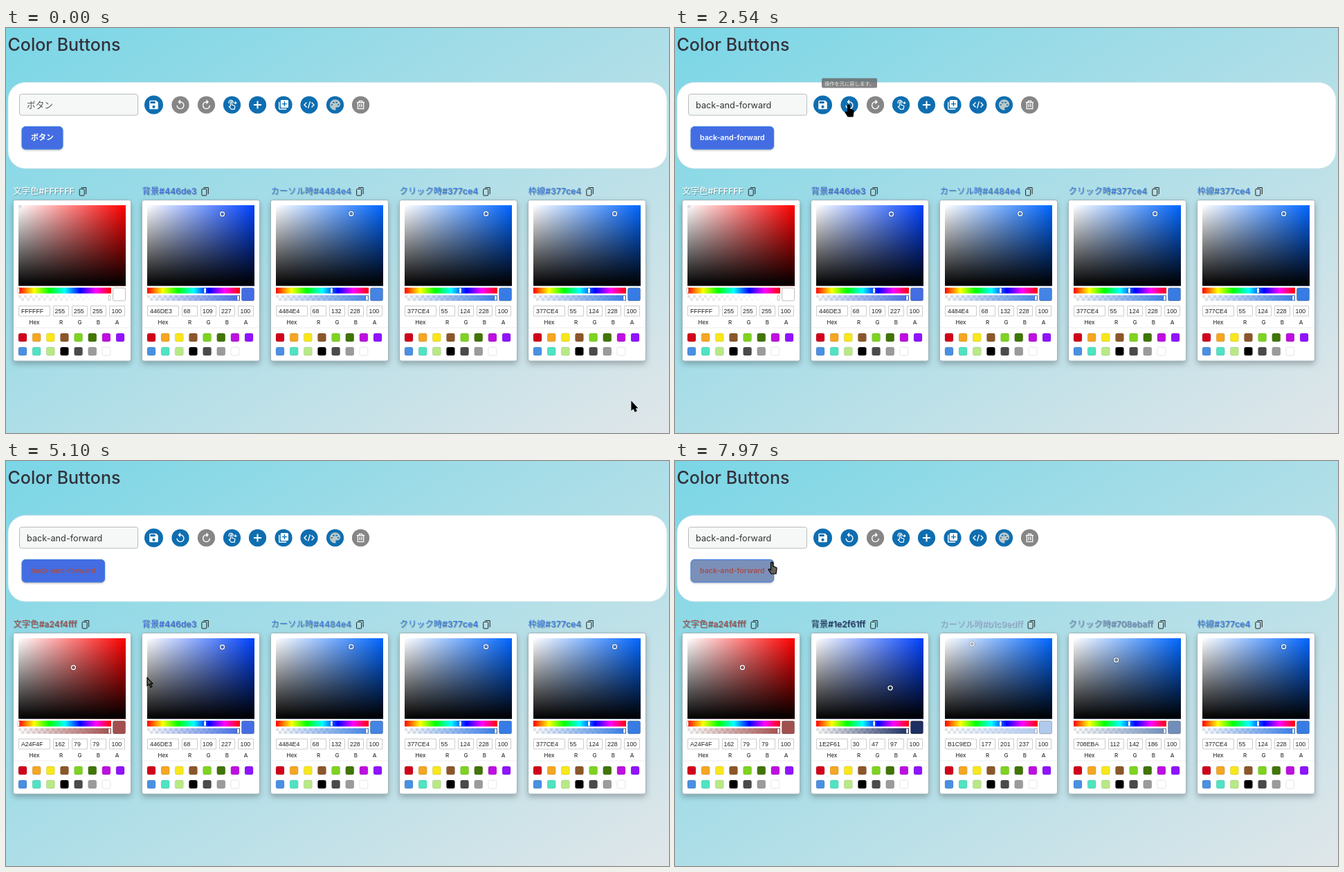
Recreate the animation shown at these times as an HTML page with a canvas. Size 958x585 px, loop 8 s.

```html
<!DOCTYPE html>
<html lang="ja">
<head>
<meta charset="utf-8">
<title>Color Buttons</title>
<style>
html, body { margin: 0; width: 100%; height: 100%; overflow: hidden; }
body { background: linear-gradient(to bottom right, #7ad6e6, #e0e6e9); }
canvas { display: block; }
</style>
</head>
<body>
<canvas id="stage" width="958" height="585"></canvas>
<script>
const c = document.getElementById('stage').getContext('2d');
const LOOP = 8000;
const SANS = 'Inter, "Noto Sans CJK JP", sans-serif';
const BLUE = '#0f6eb0', GRAY = '#868686';
const NAME = 'back-and-forward', EMPTY = 'ボタン';

// Toolbar icons on a 24 unit grid; "line" icons are stroked, others filled.
const UNDO = 'M12 5V1L7 6l5 5V7a6 6 0 1 1-6 6H4a8 8 0 1 0 8-8z';
const icons = [
  { x: 213.5, d: 'M17 3H5a2 2 0 0 0-2 2v14a2 2 0 0 0 2 2h14a2 2 0 0 0 2-2V7zM12 19a3 3 0 1 1 0-6 3 3 0 0 1 0 6zM15 9H5V5h10z' },
  { x: 252, d: UNDO },
  { x: 289.5, d: UNDO, flip: true },
  { x: 326.5, line: 1.7, d: 'M9 15V7a1.5 1.5 0 0 1 3 0v5l5 1.5q1.5.5 1.2 2L17 21h-6l-5-5 1-1 2 1M6 9a4.5 4.5 0 1 1 8.5-2M15 8h6m-2.5-2.5L21 8l-2.500 2.500' },
  { x: 363.5, line: 3, d: 'M12 4v16M4 12h16' },
  { x: 401, d: 'M4 6H2v14a2 2 0 0 0 2 2h14v-2H4zM20 2H8a2 2 0 0 0-2 2v12a2 2 0 0 0 2 2h12a2 2 0 0 0 2-2V4a2 2 0 0 0-2-2zM19 11h-4v4h-2v-4H9V9h4V5h2v4h4z' },
  { x: 438, line: 2, d: 'M7 7l-5 5 5 5M17 7l5 5-5 5M14 5l-4 14' },
  { x: 475.5, tint: '#bcc8c8', size: 0.85, d: 'M12 3a9 9 0 0 0 0 18 1.5 1.5 0 0 0 1.100-2.500A1.5 1.5 0 0 1 14.200 16H16a5 5 0 0 0 5-5c0-4.400-4-8-9-8zM5 11h3v2H5zM8 7h3v2H8zM13 7h3v2h-3zM16 11h3v2h-3z' },
  { x: 512.5, line: 1.8, d: 'M4 7h16M9 7V4h6v3M6 7v13h12V7M10 10v7M14 10v7' }
];

const presets = ['#d0021b', '#f5a623', '#f8e71c', '#8b572a', '#7ed321', '#417505', '#bd10e0', '#9013fe',
  '#4a90e2', '#50e3c2', '#b8e986', '#000', '#4a4a4a', '#9b9b9b', '#fff'];

// Each picker changes from one colour to another at a given step.
const pickers = [
  { label: '文字色', from: 'FFFFFF', to: 'a24f4fff', at: 35 },
  { label: '背景', from: '446de3', to: '1e2f61ff', at: 39 },
  { label: 'カーソル時', from: '4484e4', to: 'b1c9edff', at: 44 },
  { label: 'クリック時', from: '377ce4', to: '708ebaff', at: 49 },
  { label: '枠線', from: '377ce4', at: 99 }
];

// Keys are [step, values...], linear in between.
const pointer = [[0, 904, 540], [1, 890, 520], [5, 150, 114], [6, 110, 112], [12, 110, 112], [14, 215, 114], [15, 246, 112],
  [17, 250, 112], [23, 252, 112], [25, 290, 113], [26, 296, 113], [30, 296, 113], [32, 122, 286], [34, 97, 298], [36, 97, 298],
  [38, 311, 328], [39, 311, 328], [40, 453, 280], [42, 429, 264], [44, 429, 264], [47, 592, 284], [48, 638, 287],
  [49, 638, 287], [50, 566, 255], [53, 330, 175], [55, 150, 150], [56, 140, 147]];
const undoTip = [[14, 0], [15, .06], [17, .8], [24, .8], [26, .32], [28, 0]];
const redoTip = [[25, 0], [26, .45], [27, .8], [30, .8], [32, 0]];

function at(keys, n) {
  if (n <= keys[0][0]) return keys[0].slice(1);
  const i = keys.findIndex(k => k[0] > n);
  if (i < 0) return keys[keys.length - 1].slice(1);
  const a = keys[i - 1], b = keys[i], f = (n - a[0]) / (b[0] - a[0]);
  return a.slice(1).map((v, j) => v + (b[j + 1] - v) * f);
}

// The screen refreshes in steps: quicker at first, then about every 150 ms.
function stepAt(t) {
  if (t < 100) return 0;
  if (t < 1165) return Math.min(10, 1 + Math.floor((t - 100) / 102));
  return 11 + Math.floor((t - 1165) / 151);
}

function box(x, y, w, h, r, fill, stroke, width = 1) {
  c.beginPath();
  c.roundRect(x, y, w, h, r);
  if (fill) { c.fillStyle = fill; c.fill(); }
  if (stroke) { c.strokeStyle = stroke; c.lineWidth = width; c.stroke(); }
}

function shadow(color, y = 0, blur = 0, x = 0) {
  c.shadowColor = color; c.shadowOffsetX = x; c.shadowOffsetY = y; c.shadowBlur = blur;
}
const noShadow = () => shadow('transparent');

function text(s, x, y, font, fill, align = 'left') {
  c.font = font; c.fillStyle = fill; c.textAlign = align;
  c.fillText(s, x, y);
  return c.measureText(s).width;
}

function gradient(x0, y0, x1, y1, colors) {
  const g = c.createLinearGradient(x0, y0, x1, y1);
  colors.forEach((k, i) => g.addColorStop(i / (colors.length - 1), k));
  return g;
}

const rgb = hex => [0, 2, 4].map(i => parseInt(hex.substr(i, 2), 16));

function hsv([r, g, b]) {
  const max = Math.max(r, g, b), d = max - Math.min(r, g, b);
  let h = 0;
  if (d) h = max === r ? (g - b) / d : max === g ? 2 + (b - r) / d : 4 + (r - g) / d;
  return { h: (h * 60 + 360) % 360, s: max ? d / max : 0, v: max / 255 };
}

const codeOf = (p, n) => n >= p.at ? p.to : p.from;

function drawIcon(icon, color, r) {
  c.fillStyle = color;
  c.beginPath(); c.arc(icon.x, 111, r, 0, 7); c.fill();
  const k = (icon.size || 0.7), path = new Path2D(icon.d);
  c.save();
  c.translate(icon.x, 111);
  c.scale(icon.flip ? -k : k, k);
  c.translate(-12, -12);
  if (icon.line) { c.strokeStyle = '#fff'; c.lineWidth = icon.line; c.stroke(path); }
  else { c.fillStyle = icon.tint || '#fff'; c.fill(path, 'evenodd'); }
  c.restore();
}

function drawPicker(p, n) {
  const code = codeOf(p, n), hex = code.slice(0, 6), color = '#' + hex;
  const parts = rgb(hex), { h, s, v } = hsv(parts);

  shadow('rgba(0,0,0,.35)', 1, 1, 1);
  const end = 10.5 + text(p.label + '#' + code, 10.5, 240, `500 12.3px ${SANS}`, color);
  noShadow();
  box(end + 7.5, 232.5, 7, 9.5, 1, null, '#222');
  c.beginPath();
  c.moveTo(end + 10, 230.5); c.lineTo(end + 17, 230.5); c.lineTo(end + 17, 240);
  c.stroke();

  shadow('rgba(0,0,0,.28)', 4, 8);
  box(10.5, 248.5, 170, 232.5, 3, '#fff');
  noShadow();
  box(10.5, 248.5, 170, 232.5, 3, null, '#9eb4ba');

  c.save();
  c.beginPath(); c.rect(18, 256, 155, 116.5); c.clip();
  c.fillStyle = gradient(18, 0, 173, 0, ['#fff', `hsl(${h},100%,50%)`]);
  c.fillRect(18, 256, 155, 117);
  c.fillStyle = gradient(0, 256, 0, 372, ['rgba(0,0,0,0)', '#000']);
  c.fillRect(18, 256, 155, 117);
  const x = 18 + 155 * s, y = 256 + 116 * (1 - v);
  c.beginPath(); c.arc(x, y, 3, 0, 7);
  c.strokeStyle = 'rgba(0,0,0,.45)'; c.lineWidth = 2.6; c.stroke();
  c.strokeStyle = '#fff'; c.lineWidth = 1.4; c.stroke();
  c.restore();

  c.fillStyle = gradient(18, 0, 152, 0, ['#f00', '#ff0', '#0f0', '#0ff', '#00f', '#f0f', '#f00']);
  c.fillRect(18, 375, 134, 8.5);
  c.fillStyle = '#e4e4e4';
  for (let i = 0; i < 33; i++) c.fillRect(18 + i * 4, 386 + i % 2 * 4, 4, 4);
  c.fillStyle = gradient(18, 0, 152, 0, [`rgba(${parts},0)`, color]);
  c.fillRect(18, 386, 134, 8);
  const grip = h ? 18 + 134 * h / 360 : 18;
  box(grip - 1.5, 375.5, 3, 7.5, 1, '#fff', 'rgba(0,0,0,.3)', .6);
  box(148, 386.5, 3, 7, 1, '#fff', 'rgba(0,0,0,.4)', .6);
  box(154.5, 375.5, 18, 18.5, 2, color, 'rgba(0,0,0,.25)');

  const values = [hex.toUpperCase(), ...parts, 100];
  const left = [18.5, 68.5, 95.5, 122.5, 149.5], start = [22, 70.5, 98, 125, 152.5];
  ['Hex', 'R', 'G', 'B', 'A'].forEach((name, i) => {
    const w = i ? 22 : 45;
    box(left[i], 401.5, w, 14.5, 0, '#fff', '#ccc');
    text(values[i], start[i], 412, '8.800px "Liberation Sans", sans-serif', '#222');
    text(name, left[i] + w / 2, 427.5, `500 8px ${SANS}`, '#333', 'center');
  });

  c.fillStyle = '#eee';
  c.fillRect(11, 432.5, 169, 1);
  presets.forEach((k, i) =>
    box(18 + i % 8 * 20.15, 441 + (i > 7 ? 20 : 0), 12, 12, 2.5, k, 'rgba(0,0,0,.13)', .8));
}

function drawTip(x, label, alpha) {
  if (!alpha) return;
  c.globalAlpha = alpha;
  box(x - 40, 72.5, 80, 14, 2, '#666');
  text(label, x, 82.5, `7.300px ${SANS}`, '#fff', 'center');
  c.globalAlpha = 1;
}

function drawPointer(n, onButton) {
  const [x, y] = at(pointer, n);
  const inInput = x > 19 && x < 191 && y > 95 && y < 127;
  const hand = onButton || (n >= 17 && n <= 30);
  c.save();
  c.translate(x, y);
  c.lineWidth = 1.2;
  c.strokeStyle = '#000';
  c.fillStyle = n > 30 ? '#65605a' : '#000';
  if (inInput) {
    c.stroke(new Path2D('M-3-7h6M0-7V7M-3 7h6'));
  } else {
    const shape = new Path2D(hand
      ? 'M-1.500 0Q0-1.500 1.500 0V5L6 6.500Q7.500 7 7 9L6 16H-1L-5 10Q-4.500 8-1.500 10.500Z'
      : 'M0 0V11.500L2.700 9.200 5 14 7 13 4.800 8.600H8Z');
    c.fill(shape);
    c.stroke(shape);
  }
  c.restore();
}

function draw(t) {
  const n = stepAt(t);
  const typed = n >= 21 && n < 30 ? '' : NAME.slice(0, Math.max(0, Math.floor((n - 7) * 2.4)));
  const name = typed || EMPTY;
  const focus = n >= 6 && n <= 16;
  const canUndo = (n >= 17 && n <= 20) || n >= 30, canRedo = n >= 21 && n < 30;
  const onButton = n >= 55;

  c.clearRect(0, 0, 958, 585);
  text('Color Buttons', 2.5, 33, `500 25px ${SANS}`, '#33303a');
  box(3, 78.5, 952, 124.5, 25, '#fff', 'rgba(205,228,232,.8)');

  box(19.5, 95.5, 171, 30.5, 3, '#f6f8f8', focus ? '#2878b8' : '#b8bcbc', focus ? 1.8 : 1);
  const shown = focus ? typed : name;
  const w = text(shown, 30, 115.5, `${typed ? 400 : 300} 12.700px ${SANS}`, typed ? '#333' : '#555');
  if (focus) { c.fillStyle = '#222'; c.fillRect(30.5 + w, 104, 1, 14); }

  icons.forEach((icon, i) => {
    const off = i === 1 ? !canUndo : i === 2 ? !canRedo : i === 8;
    drawIcon(icon, off ? GRAY : BLUE, i ? 12.6 : 13.5);
  });

  const font = `${name === EMPTY ? 700 : 600} ${name === EMPTY ? 11 : 10.6}px ${SANS}`;
  c.font = font;
  const width = c.measureText(name).width + 26;
  const base = rgb(codeOf(pickers[1], n)), hover = rgb(codeOf(pickers[2], n));
  const mix = n >= 56 ? .63 : n >= 55 ? .3 : 0;
  const fill = base.map((v, i) => Math.round(v + (hover[i] - v) * mix));
  shadow('rgba(0,0,0,.3)', 1.5, 3);
  box(23, 142.5, width, 32.5, 5, `rgb(${fill})`);
  noShadow();
  box(23, 142.5, width, 32.5, 5, null, '#377ce4');
  text(name, 36, 162.3, font, '#' + codeOf(pickers[0], n).slice(0, 6));

  c.save();
  pickers.forEach(p => { drawPicker(p, n); c.translate(186, 0); });
  c.restore();

  drawTip(252, '操作を元に戻します。', at(undoTip, n)[0]);
  drawTip(289, '操作をやり直します。', at(redoTip, n)[0]);
  drawPointer(n, onButton);
}

let began;
function tick(now) {
  began ??= now;
  draw((now - began) % LOOP);
  requestAnimationFrame(tick);
}
requestAnimationFrame(tick);
</script>
</body>
</html>
```
